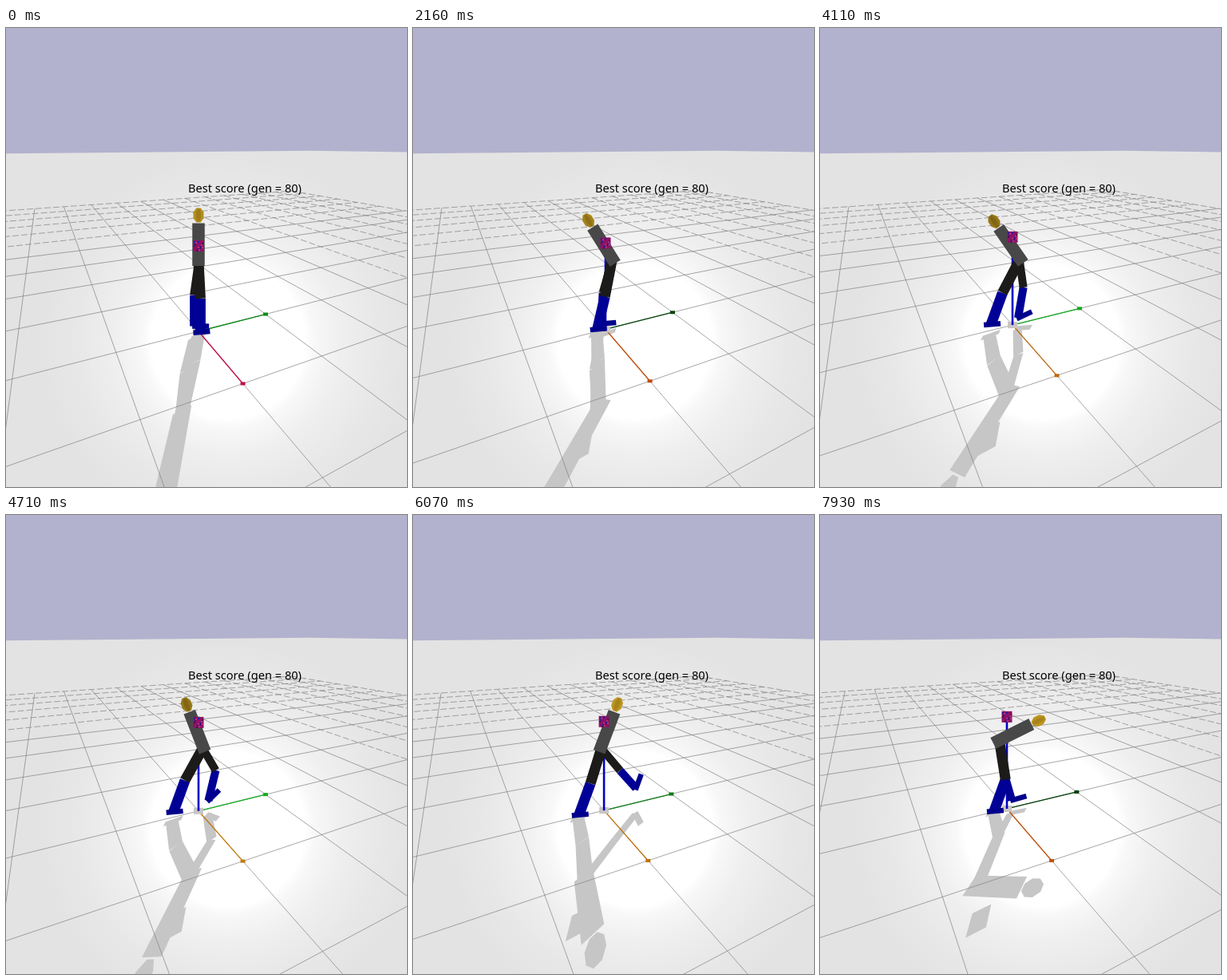
Animation of 502 by 575 pixels, one loop 8000 ms. Source, as an HTML page with a canvas:

```html
<!DOCTYPE html>
<html lang="en">
<head>
<meta charset="utf-8">
<title>Walker</title>
<style>
  html, body { margin: 0; width: 100%; height: 100%; overflow: hidden; background: #e3e3e3; }
  canvas { display: block; }
</style>
</head>
<body>
<canvas id="stage" width="502" height="575"></canvas>
<script>
const ctx = document.getElementById('stage').getContext('2d');
const LOOP = 8000, LAST = 7930, STEP = 90;

// Cosine-eased value at time t through [time, value] key points.
function track(t, ...keys) {
  const next = keys.findIndex(key => key[0] > t);
  if (next === 0) return keys[0][1];
  if (next < 0) return keys[keys.length - 1][1];
  const [t0, a] = keys[next - 1], [t1, b] = keys[next];
  return a + (b - a) * (1 - Math.cos(Math.PI * (t - t0) / (t1 - t0))) / 2;
}

// Angles in degrees: limbs hang down at 0 and swing right when positive.
const rad = degrees => degrees * Math.PI / 180;
const hang = ([x, y], angle, length) =>
  [x + Math.sin(rad(angle)) * length, y + Math.cos(rad(angle)) * length];

function leg(hip, thighAngle, thighLength, shinAngle, shinLength, footAngle, heelLength) {
  const knee = hang(hip, thighAngle, thighLength);
  const ankle = hang(knee, shinAngle, shinLength);
  const heel = hang(ankle, footAngle - 90, heelLength);
  return { hip, knee, ankle, heel, toe: hang(heel, footAngle + 90, 21) };
}

function pose(t) {
  const lean = track(t, [0, 0], [3200, -42], [8300, 65]);
  const hip = [241 - .25 * lean, 293 - .0017 * lean ** 2];
  const waist = [241 - .38 * lean, 298 - .003 * lean ** 2];
  const up = 180 - lean;
  const neck = hang(waist, up, 53.5);
  return {
    waist, neck, up,
    near: leg(hip,
      track(t, [0, 3], [4700, -29], [8300, 10]), 46,
      track(t, [1200, 0], [2800, -20]), 42, 5, 9),
    far: leg(hip,
      track(t, [0, -8], [2890, -17], [5500, 44], [LAST, 9]),
      track(t, [2890, 42], [4600, 32], [LAST, 43]),
      track(t, [0, 0], [2890, -4], [5000, -14], [6070, 42], [LAST, 16]),
      track(t, [5200, 39], [6070, 30]),
      track(t, [0, 0], [2890, 6], [6070, 70], [LAST, 16]), 2)
  };
}

// Ground perspective: X lines vanish at (46,150), Y lines at (1140,150).
const KX = -.2217, KY = .103, HORIZON = 150;
let height, shiftX, shiftY, unitZ;

function moveCamera(t) {
  height = track(t, [400, 1], [5700, .956], [6000, .955], [8000, .915]);
  shiftX = track(t, [6000, 0], [LOOP, .1]);
  shiftY = track(t, [5300, 0], [LOOP, -.12]);
  unitZ = 107 + (1 - height) * 96;
}
const depth = (x, y) => 1 + KX * (x + shiftX) + KY * (y + shiftY);
function ground(x, y) {
  const d = depth(x, y);
  return [(241 + 46 * KX * (x + shiftX) + 1140 * KY * (y + shiftY)) / d, HORIZON + 230 * height / d];
}

// Casts a screen point of the walker's vertical plane onto the floor.
function castShadow([sx, sy]) {
  const a = KX * shiftX;
  const b = (sx * (1 + a) - 241 - 46 * a) / (1140 - sx);
  const d = 1 + a + b;
  const z = Math.max(0, (HORIZON + 230 * height / d - sy) * d / unitZ);
  return ground(1.37 * z, b / KY - shiftY - .84 * z);
}

function polygon(points, color) {
  ctx.beginPath();
  points.forEach(p => ctx.lineTo(...p));
  ctx.fillStyle = color;
  ctx.fill();
}
function line(p, q, color, width) {
  ctx.beginPath();
  ctx.moveTo(...p);
  ctx.lineTo(...q);
  ctx.strokeStyle = color;
  ctx.lineWidth = width;
  ctx.stroke();
}
function bar([ax, ay], [bx, by], width) {
  const len = Math.hypot(bx - ax, by - ay);
  const nx = -(by - ay) / len * width / 2, ny = (bx - ax) / len * width / 2;
  return [[ax - nx, ay - ny], [bx - nx, by - ny], [bx + nx, by + ny], [ax + nx, ay + ny]];
}
const box = ([x, y], w, h) => bar([x, y - h / 2], [x, y + h / 2], w);

// Rounded block: an octagon stretched along the given direction.
function octagon(center, angle, width, length) {
  return Array.from({ length: 8 }, (_, i) => {
    const turn = rad(i * 45 + 22.5);
    return hang(hang(center, angle, Math.cos(turn) * length * .54), angle + 90, Math.sin(turn) * width * .54);
  });
}

function drawScene() {
  ctx.fillStyle = '#b2b2ce';
  ctx.fillRect(0, 0, 502, 575);
  polygon([[0, 157.3], [380, 153.8], [502, 155.6], [502, 575], [0, 575]], '#e3e3e3');
  const spot = ctx.createRadialGradient(278, 393, 0, 278, 393, 235);
  [[0, '#fff'], [.41, '#fff'], [.46, '#f8f8f8'], [.6, '#efefef'], [.8, '#e8e8e8'], [1, '#e3e3e3']]
    .forEach(stop => spot.addColorStop(...stop));
  ctx.fillStyle = spot;
  ctx.fillRect(0, 160, 502, 415);
}

function gridLine(x0, y0, x1, y1, dashed) {
  const near = .2, d0 = depth(x0, y0), d1 = depth(x1, y1);
  if (d0 < near && d1 < near) return;
  const at = s => ground(x0 + (x1 - x0) * s, y0 + (y1 - y0) * s);
  const cut = (near - d0) / (d1 - d0);
  ctx.setLineDash(dashed ? [8, 3] : []);
  line(at(d0 < near ? cut : 0), at(d1 < near ? cut : 1), '#848484', .72);
}
function drawGrid() {
  for (let n = -10; n <= 10; n++) {
    gridLine(n, -10, n, 10, n < -4);
    gridLine(-10, n, 10, n, n > 3);
  }
  ctx.setLineDash([]);
}

function drawCube([x, y]) {
  polygon(box([x, y], 13, 14), '#8d1264');
  for (let i = 0; i < 14; i++) {
    ctx.fillStyle = ['#2020a8', '#c03078', '#501050'][i % 3];
    ctx.fillRect(x - 6 + (i * 5) % 11, y - 6 + (i * 7) % 12, 2, 2);
  }
}

function render(t) {
  moveCamera(t);
  const { waist, neck, up, near, far } = pose(t);
  const gold = track(t, [0, 41], [4500, 34], [6070, 43]);
  const redHue = track(t, [0, 338], [1400, 383], [2890, 380], [5000, 398], [LAST, 384]);
  const greenLight = track(t, [0, 30], [1400, 13], [2600, 16], [4300, 38], [LAST, 14]);

  const legParts = (l, thighWidth, shinWidth) => [
    [bar(l.knee, l.ankle, shinWidth), '#000096'],
    [bar(l.heel, l.toe, 6.5), '#00008c'],
    [bar(l.hip, l.knee, thighWidth), '#1c1b19']
  ];
  const head = hang(neck, up, 10);
  const parts = [
    ...legParts(far, 10, 10),
    ...legParts(near, 13, 13),
    [bar(waist, neck, 15.5), '#484848'],
    [octagon(head, up, 13, 18), `hsl(45,72%,${gold}%)`],
    [octagon(head, up, 6, 16), `hsl(45,72%,${gold - 5}%)`]
  ];
  const origin = ground(0, 0), top = [origin[0], origin[1] - unitZ];

  drawScene();
  [...parts.map(([shape]) => shape), box(top, 14, 15)]
    .forEach(shape => polygon(shape.map(castShadow), '#c6c6c6'));
  drawGrid();

  [[ground(1, 0), `hsl(${redHue},88%,40%)`], [ground(0, 1), `hsl(125,80%,${greenLight}%)`]]
    .forEach(([end, color]) => {
      line(origin, end, color, 1.3);
      polygon(box(end, 6, 4), color);
    });
  polygon(box(origin, 12, 8), '#c9c5c3');
  line(origin, top, '#0000c8', 2.6);

  parts.forEach(([shape, color]) => polygon(shape, color));
  drawCube(top);

  ctx.fillStyle = '#000';
  ctx.font = '14.6px "Noto Sans", "Open Sans", sans-serif';
  ctx.fillText('Best score (gen = 80)', 228, 206);
}

function tick() {
  const t = performance.now() % LOOP;
  render(Math.min(LAST, Math.floor((t + 10) / STEP) * STEP));
  requestAnimationFrame(tick);
}
tick();
</script>
</body>
</html>
```
